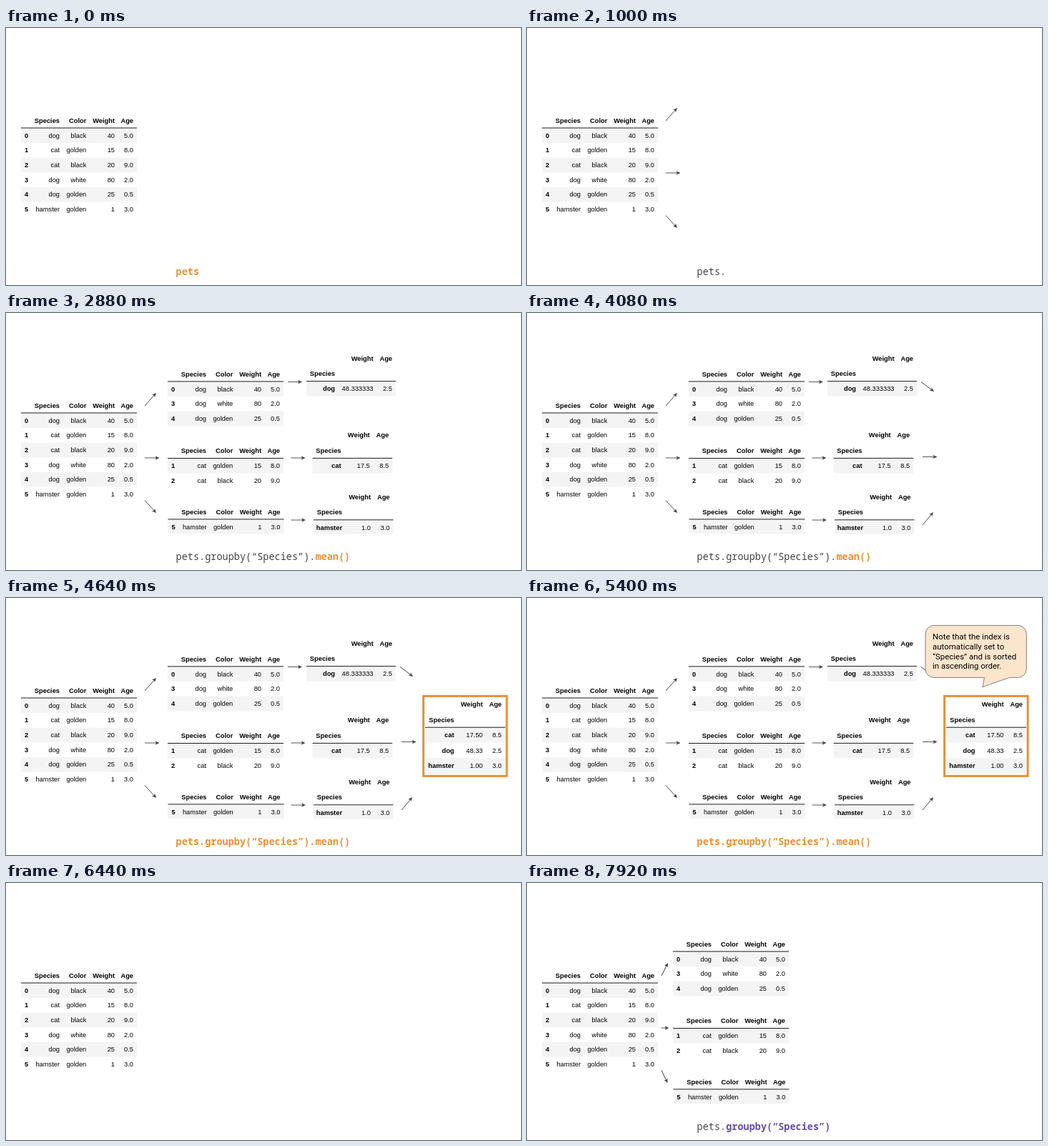
An HTML page that plays this animation: 720x360 px, repeating every 8 s.

```html
<!DOCTYPE html>
<html lang="en">
<head>
<meta charset="utf-8">
<title>Group by and mean</title>
<style>
  html, body { margin: 0; width: 100%; height: 100%; overflow: hidden; background: #fff; }
  svg { display: block; width: 720px; height: 360px; }
  text { white-space: pre; }
  .cell { font: 9.3px "Liberation Sans", Arial, sans-serif; text-anchor: end; }
  .bold { font-weight: bold; }
  .code { font: 13.54px "Noto Sans Mono", monospace; fill: #434343; }
  .note { font: 11.45px Roboto, sans-serif; fill: #000; }
  .bubble { fill: #fce5cd; stroke: #595959; stroke-width: .75; stroke-linejoin: round; }
  .shaft { stroke: #434343; stroke-width: .9; }
  .head { fill: #434343; }
</style>
</head>
<body>
<svg id="stage" viewBox="0 0 720 360"></svg>
<script>
const LOOP = 8000, CLEAR = 6440;
const ORANGE = '#e69138', PURPLE = '#674ea7';
const stage = document.getElementById('stage');
const parts = [];

function add(parent, tag, attrs, content = '') {
  const el = document.createElementNS('http://www.w3.org/2000/svg', tag);
  for (const [name, value] of Object.entries(attrs)) el.setAttribute(name, value);
  el.textContent = content;
  parent.append(el);
  return el;
}

// A group that is visible only from start to end.
function part(start, end, draw) {
  const el = add(stage, 'g', {});
  draw(el);
  parts.push({ el, start, end });
}

function cells(g, rights, y, words, allBold) {
  words.forEach((word, i) => {
    if (word === '') return;
    const bold = allBold || i === 0 ? ' bold' : '';
    add(g, 'text', { class: 'cell' + bold, x: rights[i], y: y + 3.2 }, word);
  });
}

// Rows are centred on first, first + pitch, ...; every other row is shaded.
function table(g, { left, right, rights, heads, line, first, pitch = 20.75, rows }) {
  rows.forEach((row, i) => {
    const y = first + i * pitch;
    if (i % 2 === 0) {
      add(g, 'rect', { x: left, y: y - pitch / 2, width: right - left, height: pitch, fill: '#f4f4f4' });
    }
    cells(g, rights, y, row);
  });
  heads.forEach(([y, words]) => cells(g, rights, y, words, true));
  add(g, 'path', { d: `M${left} ${line}H${right}`, stroke: '#000', 'stroke-width': .9 });
}

const pets = [
  ['0', 'dog', 'black', '40', '5.0'],
  ['1', 'cat', 'golden', '15', '8.0'],
  ['2', 'cat', 'black', '20', '9.0'],
  ['3', 'dog', 'white', '80', '2.0'],
  ['4', 'dog', 'golden', '25', '0.5'],
  ['5', 'hamster', 'golden', '1', '3.0']
];

function petTable(g, dx, headY, rows, pitch) {
  table(g, {
    left: 21 + dx, right: 183 + dx, rights: [31.2, 75, 112.3, 152, 178].map(x => x + dx),
    heads: [[headY, ['', 'Species', 'Color', 'Weight', 'Age']]],
    line: headY + 10.4, first: headY + 21, pitch, rows
  });
}

function groups(g, dx) {
  petTable(g, dx, 85.5, pets.filter(row => row[1] === 'dog'));
  petTable(g, dx, 193.1, pets.filter(row => row[1] === 'cat'));
  petTable(g, dx + .5, 278.5, pets.filter(row => row[1] === 'hamster'), 19.6);
}

function meanTable(g, left, right, headY, indexRight, rows, pitch) {
  table(g, {
    left, right, rights: [indexRight, right - 31.5, right - 5],
    heads: [[headY, ['', 'Weight', 'Age']], [headY + 21.3, ['Species']]],
    line: headY + 32.2, first: headY + 42.8, pitch, rows
  });
}

function arrows(g, list) {
  for (const [x1, y1, x2, y2] of list) {
    const angle = Math.atan2(y2 - y1, x2 - x1) * 180 / Math.PI;
    const length = Math.hypot(x2 - x1, y2 - y1);
    const arrow = add(g, 'g', { transform: `translate(${x1} ${y1}) rotate(${angle})` });
    add(arrow, 'path', { class: 'shaft', d: `M0 0H${length - 2}` });
    add(arrow, 'path', { class: 'head', d: `M${length} 0l-6 -2.7l1.6 2.7l-1.6 2.7z` });
  }
}

function code(start, end, plain, strong = '', color = ORANGE) {
  part(start, end, g => {
    const line = add(g, 'text', { class: 'code', x: 237.6, y: 346 });
    add(line, 'tspan', {}, plain);
    add(line, 'tspan', { class: 'bold', fill: color }, strong);
  });
}

// Rounded box whose pointer leaves the top or bottom edge towards the tip.
function bubble(g, x, y, w, h, tipX, tipY, textX, textY, lines) {
  const r = h / 6, a = x + w * 7 / 12, b = x + w * 10 / 12;
  const up = tipY < y;
  const top = up ? `H${a}L${tipX} ${tipY}L${b} ${y}` : '';
  const bottom = up ? '' : `H${b}L${tipX} ${tipY}L${a} ${y + h}`;
  const corner = (dx, dy) => `a${r} ${r} 0 0 1 ${dx * r} ${dy * r}`;
  add(g, 'path', {
    class: 'bubble',
    d: `M${x + r} ${y}${top}H${x + w - r}${corner(1, 1)}V${y + h - r}${corner(-1, 1)}` +
       `${bottom}H${x + r}${corner(-1, -1)}V${y + r}${corner(1, -1)}Z`
  });
  lines.forEach((line, i) => add(g, 'text', { class: 'note', x: textX, y: textY + i * 13.75 }, line));
}

part(0, LOOP, g => petTable(g, 0, 129.6, pets, 20.65));

// First walk through the steps
part(520, CLEAR, g => arrows(g, [[194, 130, 210, 112], [194, 203, 214.5, 203], [194, 262.5, 210, 280]]));
part(1360, CLEAR, g => groups(g, 205));
part(2240, CLEAR, g => arrows(g, [[394, 96.5, 414, 96.5], [398.5, 203, 418.5, 203], [398.5, 290, 419, 290]]));
part(2840, CLEAR, g => {
  meanTable(g, 420, 545, 63.4, 460, [['dog', '48.333333', '2.5']]);
  meanTable(g, 428.5, 540.2, 171.2, 468.5, [['cat', '17.5', '8.5']]);
  meanTable(g, 430, 541.5, 257.6, 470, [['hamster', '1.0', '3.0']], 18);
});
part(3920, CLEAR, g => arrows(g, [[551, 96.5, 569, 110], [553, 201.5, 573.5, 201.5], [553, 297, 568, 279]]));
part(4520, CLEAR, g => {
  meanTable(g, 586, 698, 149, 626.5, [['cat', '17.50', '8.5'], ['dog', '48.33', '2.5'], ['hamster', '1.00', '3.0']], 21.5);
  add(g, 'rect', { x: 583.6, y: 137.4, width: 116.5, height: 112, fill: 'none', stroke: ORANGE, 'stroke-width': 3 });
});

code(0, 520, '', 'pets');
code(520, 1360, 'pets.');
code(1360, 2240, 'pets.', 'groupby(“Species”)');
code(2240, 2840, 'pets.groupby(“Species”).');
code(2840, 4520, 'pets.groupby(“Species”).', 'mean()');
code(4520, CLEAR, '', 'pets.groupby(“Species”).mean()');

part(5400, CLEAR, g => bubble(g, 557, 38.4, 141.3, 73, 637, 124.6, 567, 58.1,
  ['Note that the index is', 'automatically set to', '“Species” and is sorted', 'in ascending order.']));
part(5440, CLEAR, g => bubble(g, 512, 290, 179.3, 67.6, 651, 260.6, 522.5, 314,
  ['No “Color” column, because', 'we can’t take the mean of a', 'column of strings.']));

// Second walk
const SPLIT = 7360, GROUPED = 7480;
code(6800, SPLIT, '', 'pets', PURPLE);
code(SPLIT, GROUPED, 'pets.');
code(GROUPED, LOOP, 'pets.', 'groupby(“Species”)', PURPLE);
part(SPLIT, LOOP, g => arrows(g, [[188, 130, 197, 112], [188, 203, 198.5, 203], [188, 262.5, 196.5, 280]]));
part(GROUPED, LOOP, g => groups(g, 183));

const begin = performance.now();
function frame(now) {
  const t = Math.max(0, now - begin) % LOOP;
  for (const { el, start, end } of parts) {
    el.style.display = t >= start && t < end ? '' : 'none';
  }
  requestAnimationFrame(frame);
}
frame(begin);
</script>
</body>
</html>
```
